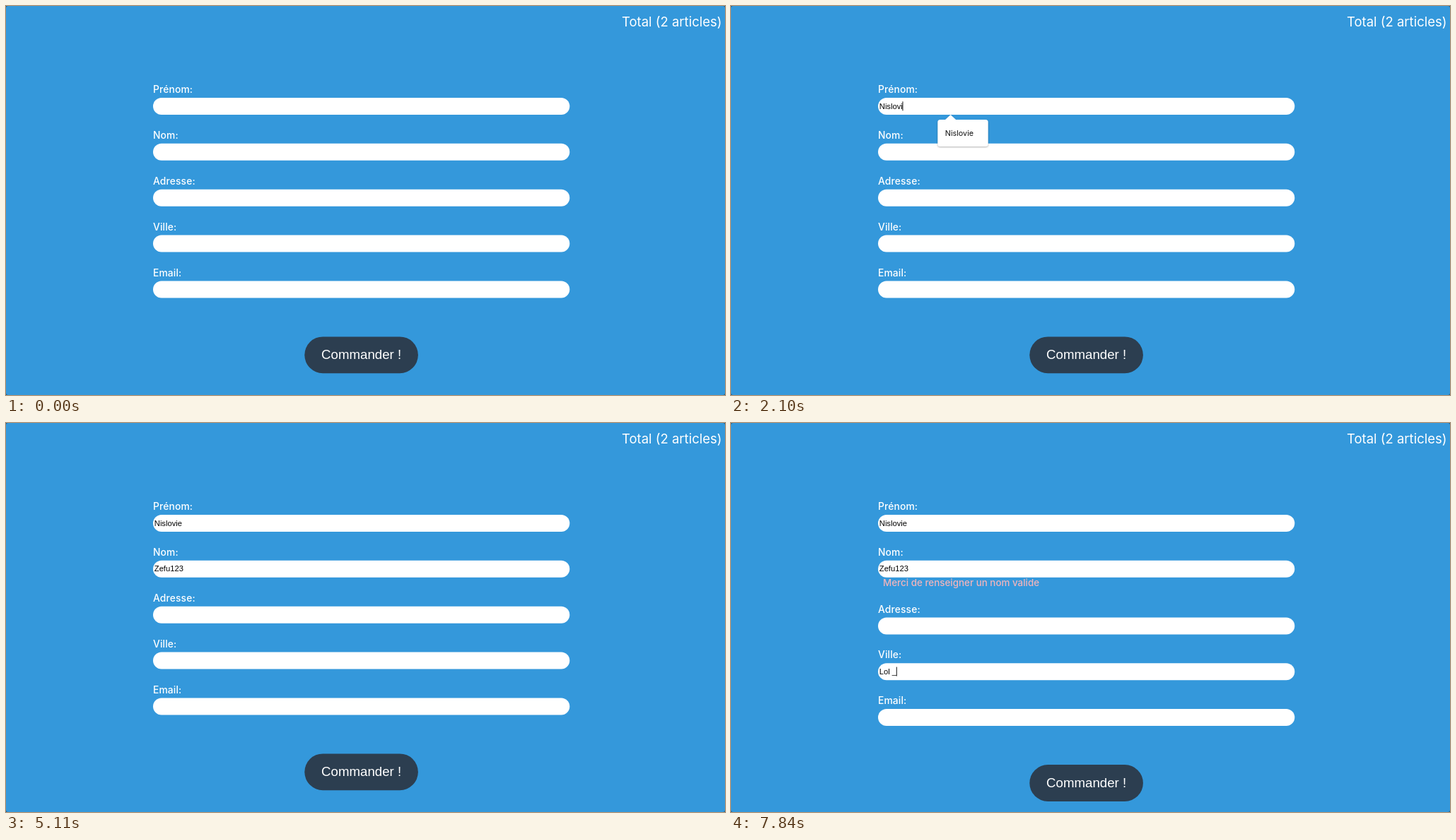
An HTML page that plays this animation: 1017 px wide and 551 px high, repeating every 8 s.

```html
<!DOCTYPE html>
<html lang="fr">
<head>
<meta charset="utf-8">
<title>Commande</title>
<style>
  html, body { margin: 0; width: 100%; height: 100%; overflow: hidden; background: #24506f; }
  svg { display: block; width: 100%; height: 100%; }
  text { white-space: pre; fill: #fff; font-family: Inter, sans-serif; }
  .total { font-size: 18.5px; text-anchor: end; }
  .label { font-size: 13.8px; font-weight: 500; letter-spacing: .15px; }
  .error { font-size: 13.4px; font-weight: 500; fill: #f0b4bc; }
  .value { font: 11.2px "Liberation Sans", sans-serif; fill: #000; }
  .button { font: 18.67px "Liberation Sans", sans-serif; text-anchor: middle; }
  .option { font-size: 10.8px; fill: #111; }
  .popup { filter: drop-shadow(0 1px 1.2px rgba(0, 0, 0, .3)); }
</style>
</head>
<body>
<svg id="stage" viewBox="0 0 1017 551" preserveAspectRatio="none"></svg>
<script>
const LOOP = 8000, LEFT = 208, TOP = 130, PITCH = 64.85, ERROR_SHIFT = 15.7;
const LABELS = ['Prénom:', 'Nom:', 'Adresse:', 'Ville:', 'Email:'];
const NAME = 'Nislovie';
const LISTS = {
  all: [NAME, 'nixy', 'Test', 'test'],
  pair: [NAME, 'nixy'],
  single: [NAME],
  towns: ['Chelles', 'Paris', 'paris']
};

const stage = document.getElementById('stage');

function add(tag, attrs, parent = stage, content = '') {
  const node = document.createElementNS('http://www.w3.org/2000/svg', tag);
  for (const key in attrs) node.setAttribute(key, attrs[key]);
  node.textContent = content;
  parent.appendChild(node);
  return node;
}

const label = (cls, x, y, content, parent) => add('text', { class: cls, x, y }, parent, content);
const show = (node, on) => node.setAttribute('visibility', on ? 'visible' : 'hidden');

add('rect', { width: 1017, height: 551, rx: 3, fill: '#3498db' });
label('total', 1012.5, 29, 'Total (2 articles)');

const fields = LABELS.map((name, i) => {
  const top = TOP + i * PITCH;
  const group = add('g', {});
  label('label', LEFT, top - 6.8, name, group);
  add('rect', { x: LEFT, y: top, width: 589.3, height: 24, rx: 12, fill: '#fff' }, group);
  return { top, group, value: label('value', 209.8, top + 15.6, '', group) };
});

const button = add('g', {});
add('rect', { x: 422.3, y: 468.4, width: 160.6, height: 51.8, rx: 25.9, fill: '#2c3e50' }, button);
label('button', 502.6, 500.3, 'Commander !', button);

const error = label('error', 215, 231, 'Merci de renseigner un nom valide');
const caret = add('rect', { width: 1, height: 13, fill: '#111' });

function makePopup(options) {
  const group = add('g', { class: 'popup' });
  const height = 7.6 + options.length * 30.4;
  add('path', { d: 'M302.5 161.5L310.6 154L318.7 161.5Z', fill: '#fff' }, group);
  add('rect', { x: 292.3, y: 161, width: 71.4, height, rx: 3.5, fill: '#fff' }, group);
  options.forEach((name, i) => label('option', 302.8, 184 + i * 30.5, name, group));
  return group;
}
const popups = Object.fromEntries(Object.entries(LISTS).map(([key, list]) => [key, makePopup(list)]));

// Each step: start time, focused field, its text, caret shown, open list.
const STEPS = [
  [0, 0, '', false],
  [140, 0, '', true, 'all'],
  [700, 0, 'N', true, 'pair'],
  [980, 0, 'Ni', true, 'pair'],
  [1050, 0, 'Nis', true, 'single'],
  [1260, 0, 'Nisi', true],
  [1540, 0, 'Nis', true, 'single'],
  [1750, 0, 'Nisl', true, 'single'],
  [1820, 0, 'Nislo', true, 'single'],
  [1960, 0, 'Nislov', true, 'single'],
  [2100, 0, 'Nislovi', true, 'single'],
  [2170, 0, NAME, true],
  [2380, 1, '', true],
  [2870, 1, '', false],
  [2940, 1, 'Z', true],
  [3220, 1, 'Ze', true],
  [3360, 1, 'Zef', true],
  [3430, 1, 'Zefu', true],
  [3920, 1, 'Zefu', false],
  [4060, 1, 'Zefu1', true],
  [4270, 1, 'Zefu12', true],
  [4550, 1, 'Zefu123', true],
  [5110, 1, 'Zefu123', false],
  [5320, 2, '', false],
  [6160, 3, '', true, 'towns'],
  [6650, 3, '', false, 'towns'],
  [6720, 3, 'L', true],
  [6860, 3, 'Lo', true],
  [7000, 3, 'Lol', true],
  [7350, 3, 'Lol ', true],
  [7840, 3, 'Lol _', true]
];

const pen = document.createElement('canvas').getContext('2d');
pen.font = '11.2px "Liberation Sans", sans-serif';

function draw(index) {
  const values = LABELS.map(() => '');
  for (const [, field, text] of STEPS.slice(0, index + 1)) values[field] = text;
  const [, focus, text, caretOn, list] = STEPS[index];
  const invalid = focus > 1;
  const shift = i => invalid && i > 1 ? ERROR_SHIFT : 0;

  fields.forEach((field, i) => {
    field.value.textContent = values[i];
    field.group.setAttribute('transform', `translate(0 ${shift(i)})`);
  });
  button.setAttribute('transform', `translate(0 ${shift(5)})`);
  show(error, invalid);

  const offset = focus * PITCH + shift(focus);
  caret.setAttribute('x', 209.5 + pen.measureText(text).width);
  caret.setAttribute('y', TOP + 5.3 + offset);
  show(caret, caretOn);
  for (const key in popups) {
    show(popups[key], key === list);
    popups[key].setAttribute('transform', `translate(0 ${offset})`);
  }
}

let current = -1;
const start = performance.now();
function tick() {
  const time = (performance.now() - start) % LOOP;
  const index = STEPS.filter(step => step[0] <= time).length - 1;
  if (index !== current) draw(current = index);
  requestAnimationFrame(tick);
}
tick();
</script>
</body>
</html>
```
